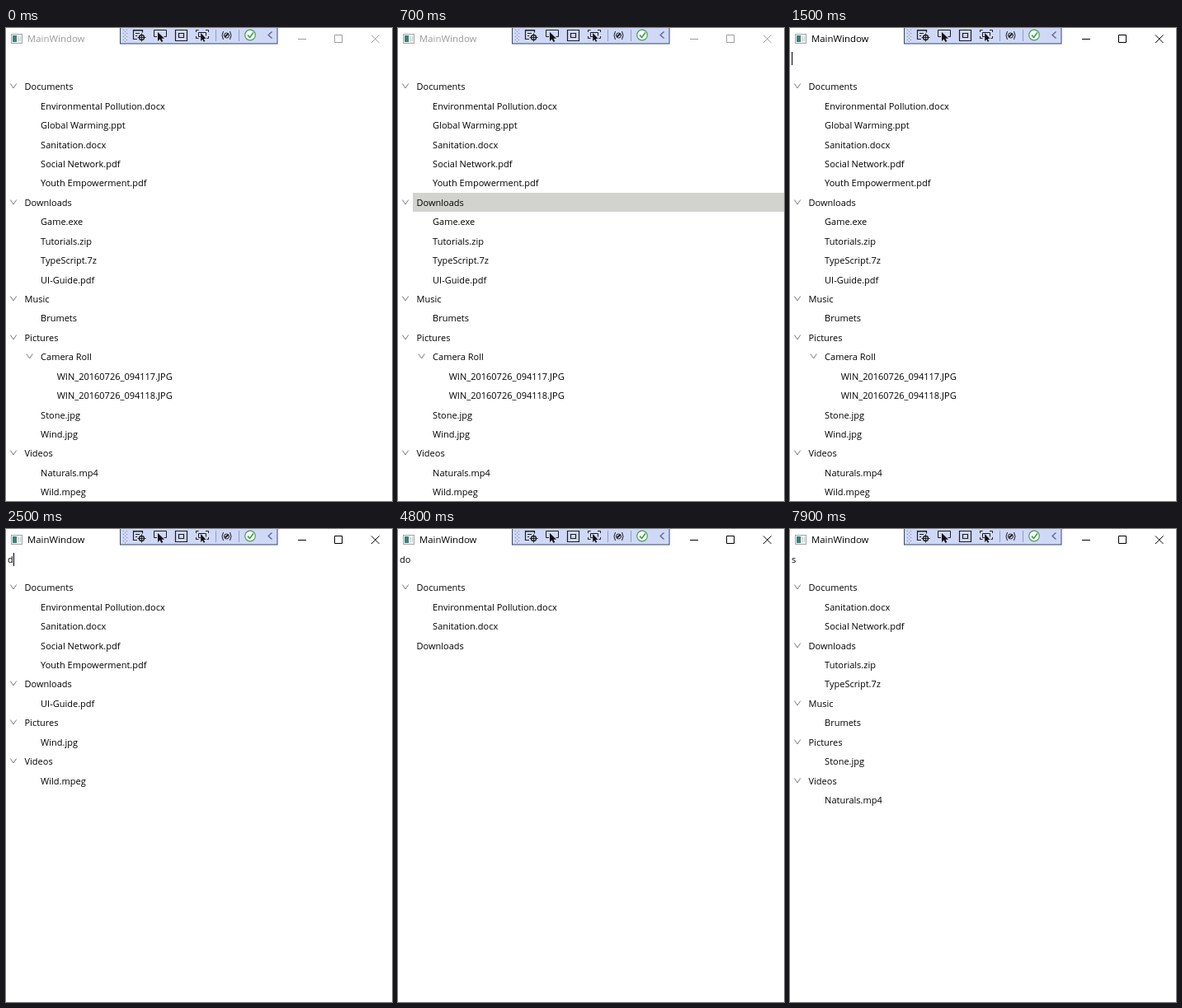
An HTML page for the animation above (8000 ms loop, 468x574 px).

```html
<!DOCTYPE html>
<html lang="en">
<head>
<meta charset="utf-8">
<title>Tree filter</title>
<style>
  html, body { margin: 0; width: 468px; height: 574px; overflow: hidden; background: #fff; }
  svg { display: block; font: 11px "Open Sans", "Noto Sans", sans-serif; }
  .line { fill: none; stroke: #1e1e1e; }
  #chrome { stroke: #9a9a9a; fill: none; }
  #title { font-size: 11.4px; fill: #9a9a9a; }
  .active #chrome { stroke: #000; }
  .active #title { fill: #000; }
</style>
</head>
<body>
<svg id="stage" width="468" height="574" viewBox="0 0 468 574">
  <!-- title bar -->
  <rect x="6.5" y="7.5" width="13" height="11" fill="#f4f4f4" stroke="#a0a5a8"/>
  <rect x="8" y="9" width="5" height="8" fill="#3c8276"/>
  <path d="M15 10v6M17.5 10v6" stroke="#c4c8cc"/>
  <text id="title" x="26" y="17">MainWindow</text>
  <path id="chrome" d="M354 13.5h10M398.5 8.5h9v9h-9zM443 8.5l9.5 9.5M452.5 8.5l-9.5 9.5"/>

  <!-- debug toolbar -->
  <rect x="138.5" y="-1" width="190.5" height="20" fill="#cfd9f7" stroke="#39456f"/>
  <path d="M142.5 2v15M146.5 2v15M144.5 4v13" stroke="#7482ad" stroke-dasharray="1 3"/>
  <path d="M254.5 2v14M282.5 2v14" stroke="#8f9cc4"/>
  <g class="line">
    <path d="M159 13.5h-4.5v-11h11v3M154 3h12M157 6.5h5M157 9.5h2" stroke-width="1.2"/>
    <circle cx="164.5" cy="11.5" r="3" stroke-width="1.4"/>
    <path d="M164.5 6.5v10M159.5 11.5h10"/>
    <path d="M183 10.5h-3.5v-8h15v8h-3"/>
    <path d="M205.5 2.5h14v13h-14zM209.5 6.5h6v5h-6z" stroke-width="1.2"/>
    <path d="M230.5 5v-2.5h3M242 2.5h3.5v2.5M230.5 10v2.5h3M236 10.5h-2.500v-5h9v4M245.5 10v2.5h-2"/>
    <path d="M263.5 4q-3 5 0 10M271.5 4q3 5 0 10"/>
    <circle cx="267.5" cy="9" r="3"/>
    <path d="M265.5 10.5l4-3.500" stroke-width="1.800"/>
  </g>
  <path id="pointer" d="M184 5v11l2.500-2.500 2 3.500 1.800-1-1.800-3.300h3.500z" fill="#111"/>
  <use href="#pointer" transform="translate(89 1.500) scale(.8 .9)"/>
  <circle cx="296" cy="8.500" r="6.300" fill="#fff" stroke="#4a9b53" stroke-width="1.200"/>
  <path d="M293 8.500l2.500 3 4.500-6" fill="none" stroke="#36a344" stroke-width="1.700"/>
  <path d="M322.500 4.500l-4.500 4 4.500 4" fill="none" stroke="#555f80" stroke-width="1.200"/>

  <!-- search box -->
  <text id="query" x="2" y="41"></text>
  <rect id="caret" y="29" width="1" height="16"/>
  <g id="list"></g>
</svg>
<script>
const LOOP = 8000, ROW = 23.43, INDENT = 19.6;
const $ = id => document.getElementById(id);

// One space of indent per level.
const nodes = `Documents
 Environmental Pollution.docx
 Global Warming.ppt
 Sanitation.docx
 Social Network.pdf
 Youth Empowerment.pdf
Downloads
 Game.exe
 Tutorials.zip
 TypeScript.7z
 UI-Guide.pdf
Music
 Brumets
Pictures
 Camera Roll
  WIN_20160726_094117.JPG
  WIN_20160726_094118.JPG
 Stone.jpg
 Wind.jpg
Videos
 Naturals.mp4
 Wild.mpeg`.split('\n').map(line => ({ name: line.trim(), depth: line.search(/\S/) }));

// [start time, value]
const queries = [[0, ''], [2500, 'd'], [2600, 'do'], [5200, 'd'], [5700, ''], [7200, 's']];
const hovers = [[0, -1], [400, 13], [500, 12], [600, 9], [700, 6], [800, 3], [900, 1], [1000, 0], [1100, -1]];
const carets = [[0, 0], [1500, 1], [2100, 0], [2500, 1], [2900, 0], [3400, 1], [3900, 0],
                [4300, 1], [4800, 0], [5200, 1], [6300, 0], [6700, 1], [7700, 0]];
const at = (track, t) => track.findLast(([start]) => start <= t)[1];

// A node stays when it or any descendant contains the query.
function filterNodes(query) {
  return nodes.filter((node, i) => {
    let end = i + 1;
    while (nodes[end]?.depth > node.depth) end++;
    return nodes.slice(i, end).some(n => n.name.toLowerCase().includes(query));
  });
}

function rowMarkup(node, i, rows, hover) {
  const x = node.depth * INDENT, y = Math.round(71.3 + i * ROW);
  const highlight = i === hover
    ? `<rect x="${Math.round(18 + x)}" y="${y - 12}" width="450" height="23" fill="#d2d2ce"/>` : '';
  const chevron = rows[i + 1]?.depth > node.depth
    ? `<path d="M${5.3 + x} ${y - 3.5}l3.700 5.500 3.700-5.500" fill="none" stroke="#777"/>` : '';
  return `${highlight}${chevron}<text x="${22.5 + x}" y="${y + 4}">${node.name}</text>`;
}

let shown;
function draw(now) {
  const t = now % LOOP;
  const query = at(queries, t), hover = at(hovers, t);
  $('stage').classList.toggle('active', t >= 1500);
  const key = query + '|' + hover;
  if (key !== shown) {
    shown = key;
    $('query').textContent = query;
    $('caret').setAttribute('x', Math.round(2 + $('query').getComputedTextLength()));
    $('list').innerHTML = filterNodes(query).map((n, i, rows) => rowMarkup(n, i, rows, hover)).join('');
  }
  $('caret').setAttribute('opacity', at(carets, t));
}

const start = performance.now();
function tick() {
  draw(performance.now() - start);
  requestAnimationFrame(tick);
}
tick();
</script>
</body>
</html>
```
